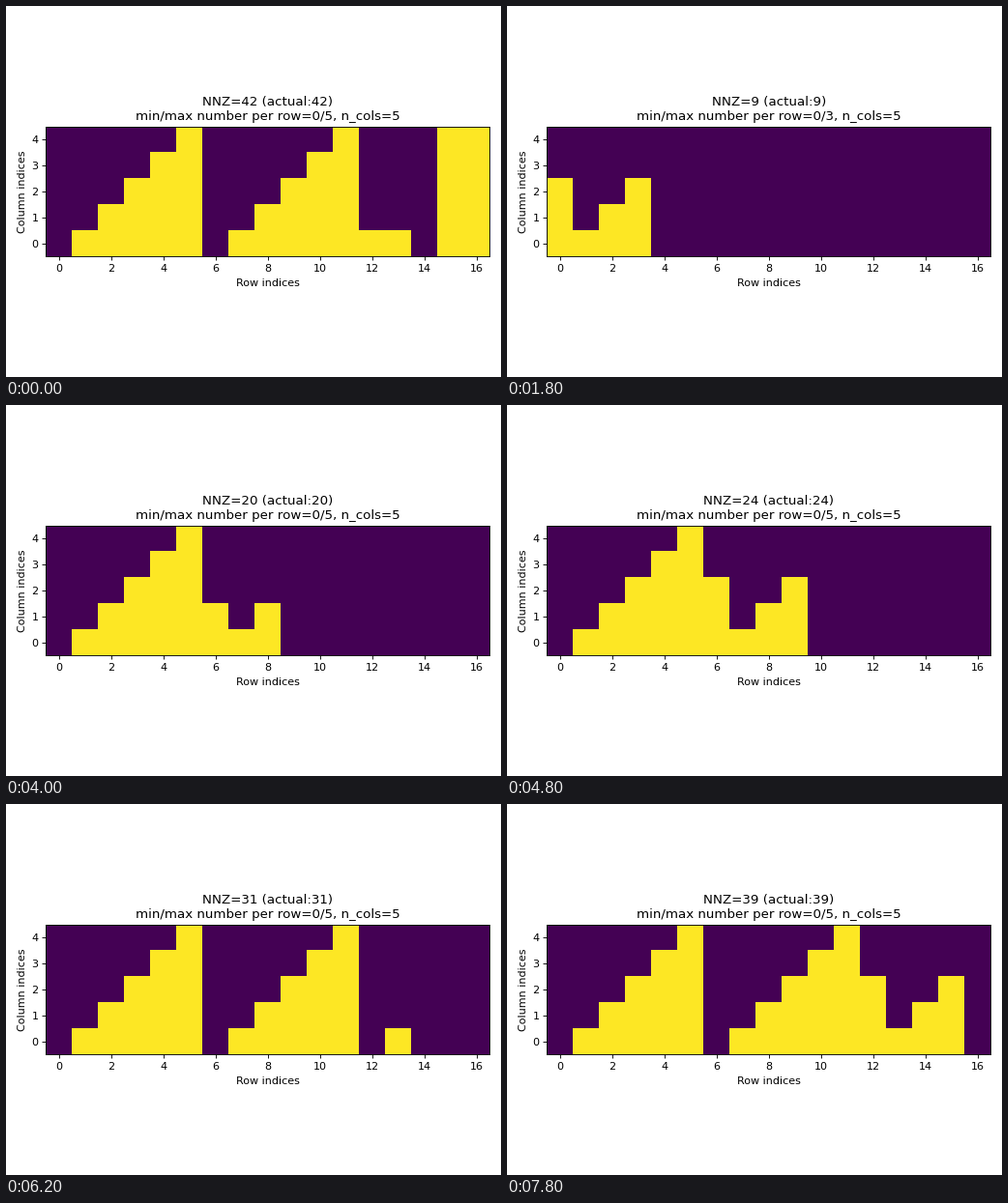
Recreate the animation shown at these times as a matplotlib script. Size 512 by 384 pixels, loop 8 s.

```python
import math

import matplotlib.pyplot as plt
import numpy as np
from matplotlib.animation import FuncAnimation

ROWS, COLS = 17, 5
TOOTH = COLS * (COLS + 1) // 2
FRAMES, STEP_MS = 40, 200
START_NNZ = 42


def teeth_sum(width):
    """Total count of a sawtooth sequence filling the given width."""
    full, rest = divmod(width, COLS + 1)
    return TOOTH * full + rest * (rest - 1) // 2


def row_counts(nnz):
    """Spread nnz elements over the rows as sawteeth plus full rows."""
    counts = np.zeros(ROWS, dtype=int)
    full = 0
    while nnz - full * COLS >= max(teeth_sum(ROWS - full), COLS):
        full += 1
    counts[ROWS - full:] = COLS

    teeth, rest = divmod(nnz - full * COLS, TOOTH)
    start = teeth * (COLS + 1)
    counts[:start] = np.arange(start) % (COLS + 1)

    # incomplete tooth, with the remainder put on its first row
    k = (math.isqrt(8 * rest + 1) - 1) // 2
    counts[start:start + k + 1] = np.arange(k + 1)
    counts[start] += rest - k * (k + 1) // 2
    return counts


def draw(i):
    nnz = i or START_NNZ
    counts = row_counts(nnz)
    image.set_data(np.arange(COLS)[:, None] < counts)
    title.set_text(
        f"NNZ={nnz} (actual:{counts.sum()})\n"
        f"min/max number per row={counts.min()}/{counts.max()}, n_cols={COLS}"
    )
    return image, title


plt.rcParams["font.family"] = "DejaVu Sans"
fig, ax = plt.subplots(figsize=(6.4, 4.8), dpi=80)
image = ax.imshow(np.zeros((COLS, ROWS)), origin="lower", cmap="viridis",
                  vmin=0, vmax=1)
title = ax.set_title("")
ax.set_xlabel("Row indices")
ax.set_ylabel("Column indices")
ax.set_xticks(range(0, ROWS, 2))
ax.set_yticks(range(COLS))
draw(0)
fig.tight_layout()

anim = FuncAnimation(fig, draw, frames=FRAMES, interval=STEP_MS,
                     repeat=True, repeat_delay=0, blit=False)
plt.show()
```
